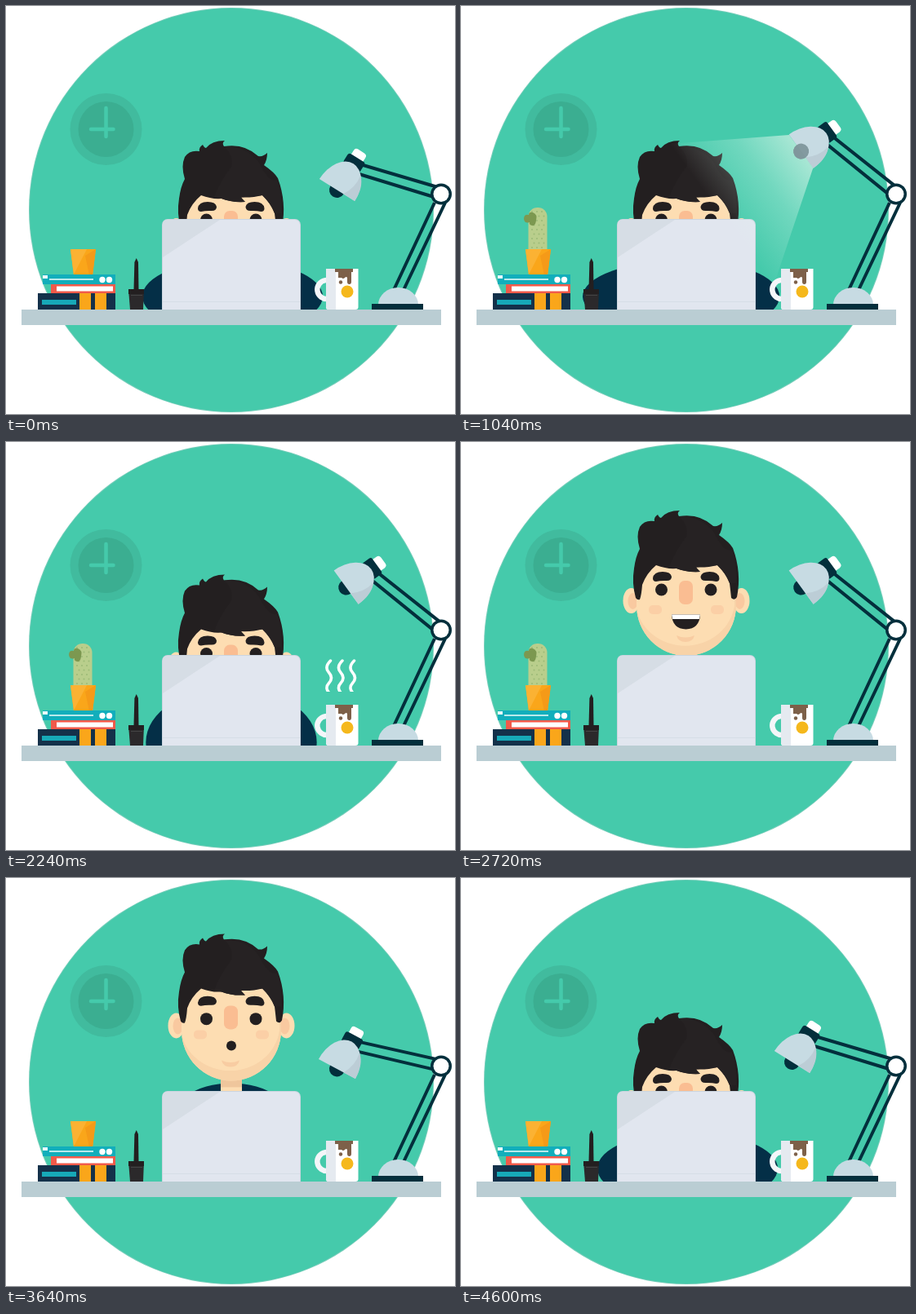
Write an HTML page with a canvas that moves like this. It is 550 px wide and 500 px high and loops after 4.64 s.

```html
<!DOCTYPE html>
<html lang="en">
<head>
<meta charset="utf-8">
<title>At the desk</title>
<style>
  html, body { margin: 0; width: 100%; height: 100%; overflow: hidden; background: #fff; }
  canvas { display: block; }
</style>
</head>
<body>
<canvas id="stage" width="550" height="500"></canvas>
<script>
const ctx = document.getElementById('stage').getContext('2d');
const LOOP = 4640;
const GREEN = '#45caab', NAVY = '#042f47', INK = '#032f3c', HAIR = '#231f20';
const SKIN = '#fdddb2', BLUSH = '#f9c9a0', STEEL = '#c7dbe3', ORANGE = '#faa61a';

// Eased value of a [time, value] track.
function track(t, keys) {
  if (t <= keys[0][0]) return keys[0][1];
  for (let i = 1; i < keys.length; i++) {
    const [t0, a] = keys[i - 1], [t1, b] = keys[i];
    if (t < t1) {
      const p = (t - t0) / (t1 - t0);
      return a + (b - a) * p * p * (3 - 2 * p);
    }
  }
  return keys[keys.length - 1][1];
}

const TRACKS = {
  head: [[2200, 0], [2600, -81], [2760, -81], [3180, -91], [3560, -91], [3760, -101], [4200, -101], [4480, 0]],
  surprise: [[3520, 0], [3720, 1], [4280, 1], [4440, 0]],
  lamp: [[360, 0], [440, -4], [700, 26], [840, 22], [3140, 22], [3240, 27], [3660, -4], [4000, 0]],
  beam: [[860, 0], [960, 1], [1400, 1], [1520, 0]],
  cactus: [[520, 0], [760, 1.08], [880, 1], [3240, 1], [3440, 0]],
  squash: [[3120, 0], [3240, 1], [3480, 0]],
  steam: [[1400, 0], [1600, 1], [2200, 1], [2400, 2], [3800, 2], [3800.1, 0], [4040, 1], [4360, 1], [4520, 2]],
  leftArm: [[600, 109], [1000, 127], [1200, 127], [1600, 115], [2160, 115], [2400, 76], [4280, 76], [4520, 109]],
  rightArm: [[0, 112], [1600, 115], [2160, 115], [2400, 76], [4280, 76], [4520, 112]],
  slump: [[1200, 0], [1600, 1], [2160, 1], [2400, 0]]
};

function fill(color, path) {
  ctx.fillStyle = color;
  ctx.beginPath();
  path();
  ctx.fill();
}
const rect = (x, y, w, h, color) => fill(color, () => ctx.rect(x, y, w, h));
const round = (x, y, w, h, r, color) => fill(color, () => ctx.roundRect(x, y, w, h, r));
const oval = (x, y, rx, ry, color) => fill(color, () => ctx.ellipse(x, y, rx, ry, 0, 0, Math.PI * 2));
const disc = (x, y, r, color) => oval(x, y, r, r, color);
const shape = (color, d) => { ctx.fillStyle = color; ctx.fill(new Path2D(d)); };
function stroke(color, width, d, cap = 'butt') {
  ctx.strokeStyle = color;
  ctx.lineWidth = width;
  ctx.lineCap = cap;
  ctx.stroke(new Path2D(d));
}
function group(draw) {
  ctx.save();
  draw();
  ctx.restore();
}

function background() {
  rect(0, 0, 550, 500, '#fff');
  disc(276, 250, 248, '#74cdb9');
  disc(276, 250, 247, GREEN);
  disc(122.5, 151, 44, '#41bb9e');
  disc(122.5, 151, 34, '#3bae91');
  stroke(GREEN, 4.5, 'M122.5 125V160M104 151H131.5', 'round');
}

function body(s) {
  group(() => {
    ctx.beginPath();
    ctx.rect(0, 0, 550, 373);
    ctx.clip();
    const y = 356 + 16 * s.slump, height = 45 + 30 * s.slump;
    fill(NAVY, () => {
      ctx.ellipse(276, y, s.leftArm, height, 0, Math.PI / 2, Math.PI * 1.5);
      ctx.ellipse(276, y, s.rightArm, height, 0, -Math.PI / 2, Math.PI / 2);
    });
    oval(276, 401 + s.head, 80, 55, NAVY);
  });
  rect(263, 330 + s.head, 26, 32, SKIN);
  rect(263, 330 + s.head, 26, 21, '#efc69c');
}

const HAIR_PATH = 'M214 181Q209 163 212 145Q214 130 219 121Q214 105 219 94Q225 85 237 87Q236 82 241 79' +
  'Q243 83 245 83Q252 74 268 74Q264 77 267 81Q292 77 309 93Q315 94 320 89Q320 98 316 104Q329 113 333 120' +
  'Q344 150 338 180Q335 185 331 181Q330 171 329 163Q323 149 314 141Q303 144 288 143.5Q289 147 293 149' +
  'Q276 150 264 145Q252 146 239 141Q227 151 222 165Q221 178 219 183Q216 184 214 181Z';

function head(s) {
  const lift = s.surprise;
  group(() => {
    ctx.translate(0, s.head + 91);
    for (const x of [208.5, 343.5]) {
      oval(x, 184.5, 10, 15.5, SKIN);
      oval(x + (x < 276 ? 2 : -2), 185, 6, 10, BLUSH);
    }
    const face = new Path2D('M221 130H330V165L337 175V190A61 62 0 0 1 215 190V175L221 165Z');
    ctx.fillStyle = SKIN;
    ctx.fill(face);
    group(() => {
      ctx.clip(face);
      shape('#f8d3a8', 'M338 175V252H214V190A61 57 0 0 0 335 190V175Z');
    });
    round(230, 190, 16, 11, 5, '#fbcfa6');
    round(306, 190, 16, 11, 5, '#fbcfa6');
    shape('#f8cca2', 'M264 227Q275 232 286 227Q284 235 275 235Q266 235 264 227Z');
    round(267, 160, 17, 29, 7, '#fabd92');
    for (const x of [245.5, 306]) disc(x, 171 + 8 * lift, 7.5, HAIR);
    group(() => {
      ctx.translate(0, -lift);
      shape(HAIR, 'M235 157Q236 149 247 149Q257 149 258 155Q258 160 252 160Q245 159.5 239 161Q235 161 235 157Z' +
        'M316.5 157Q315.5 149 304.5 149Q294.5 149 293.5 155Q293.5 160 299.5 160Q306.5 159.5 312.5 161Q316.5 161 316.5 157Z');
    });
    if (lift > 0.5) {
      disc(276, 209, 6, HAIR);
    } else {
      shape(HAIR, 'M258 201.5H293Q292 219 275.5 219.5Q259 219 258 201.5Z');
      shape('#fff', 'M258 201.5H293L291.8 207H259.2Z');
    }
    ctx.translate(0, -3 * lift);
    shape(HAIR, HAIR_PATH);
    shape('#262223', 'M267 81Q279 92 276 106Q262 124 255 143L264 145Q276 150 293 149L288 143.5L314 141Q326 153 329 163L337 163Q338 137 332 122Q322 126 310 101Q295 81 267 81Z');
  });
}

function laptop() {
  round(191, 261, 170, 112, [7, 7, 0, 0], '#cbd5df');
  round(192, 262, 168, 111, [6, 6, 0, 0], '#e1e6ef');
  shape('#d6dde5', 'M192 308V268Q192 262 198 262H262Z');
  rect(192, 362, 168, 1, '#d5dde6');
}

function books() {
  rect(39, 352, 95, 20, '#14314a');
  rect(44, 360, 42, 6, '#17a9b8');
  rect(90, 352, 14, 20, ORANGE);
  rect(109, 352, 14, 20, ORANGE);
  rect(55, 341, 79, 11, '#f15a4a');
  rect(62, 343.5, 69, 6, '#fff');
  rect(45, 329, 89, 12, '#12aebb');
  rect(45, 330, 6, 4, '#eafafa');
  rect(53, 334, 54, 2, '#b8eaec');
  disc(118, 335.5, 3.7, '#fff');
  disc(126.5, 335.5, 3.7, '#fff');
}

function plant(s) {
  group(() => {
    ctx.translate(94.5, 330);
    ctx.scale(1 - 0.2 * s.squash, 1 - 0.07 * s.squash);
    ctx.translate(-94.5, -330);
    if (s.cactus > 0.01) {
      group(() => {
        ctx.beginPath();
        ctx.rect(60, 220, 70, 79);
        ctx.clip();
        ctx.translate(0, 54 * (1 - s.cactus));
        round(82.5, 247, 23, 70, [11, 11, 0, 0], '#b9ce8c');
        for (let row = 0; row < 9; row++)
          for (let col = 0; col < 3; col++)
            disc(87 + col * 6 + (row % 2) * 2.5, 252 + row * 5.5, 1, '#9dba77');
        shape('#7c9850', 'M77 261Q77 255 83 256Q83 252 88 253Q94 255 92 263Q91 270 87 269Q83 268 84 265Q78 267 77 261Z');
      });
    }
    shape(ORANGE, 'M79 298H110L106 330H83Z');
    shape('#fbb233', 'M79 298H99L83 329Z');
    shape('#f59a18', 'M97 306L110 298L106 330H102Z');
  });
}

function penPot() {
  shape(HAIR, 'M159.7 309L162 314L162.5 348H156.5L157.4 314Z');
  shape('#2b292b', 'M150 347H169L168 372H152Z');
  rect(150, 347, 19, 6, HAIR);
  rect(153, 354, 14, 1, '#444');
}

function mug() {
  ctx.strokeStyle = '#f4f6f9';
  ctx.lineWidth = 6.5;
  ctx.beginPath();
  ctx.ellipse(393, 347.5, 11.7, 11.5, 0, Math.PI * 0.45, Math.PI * 1.55);
  ctx.stroke();
  shape('#fff', 'M392 322H431.5V369Q431.5 372 428 372H395Q392 372 392 369Z');
  shape('#e5eaf0', 'M392 322H404V372H395Q392 372 392 369Z');
  shape('#7d6049', 'M403 322H425V326H423V338Q423 341 420.5 341Q418 341 418 338V333Q417 331 415 333Q413 335 411 333H407V326H403Z');
  disc(410, 338.5, 2.2, '#7d6049');
  disc(418, 350, 7.5, '#f5b81c');
}

function steam(amount) {
  if (amount <= 0 || amount >= 2) return;
  const top = 311 - 46 * Math.min(1, amount);
  const bottom = 311 - 46 * Math.max(0, amount - 1);
  group(() => {
    ctx.beginPath();
    ctx.rect(385, top, 50, bottom - top);
    ctx.clip();
    for (const x of [395.5, 410, 424.5])
      stroke('#fff', 3.5, `M${x + 2} 268Q${x - 6} 276 ${x} 282.5Q${x + 6} 289 ${x} 295.5Q${x - 6} 302 ${x + 2} 309`, 'round');
  });
}

function lampHead(s) {
  group(() => {
    ctx.translate(405.5, 225.5);
    ctx.rotate(32 * Math.PI / 180);
    disc(0, 0, 9.5, INK);
    if (s.beam > 0) {
      const light = ctx.createLinearGradient(0, 0, 0, 125);
      light.addColorStop(0, 'rgba(235,250,240,.6)');
      light.addColorStop(0.45, 'rgba(225,250,240,.28)');
      light.addColorStop(1, 'rgba(225,250,240,0)');
      ctx.globalAlpha = s.beam;
      shape(light, 'M-25 0H25L114 125H-102Z');
      ctx.globalAlpha = 1;
    }
    round(-8.5, -56, 17, 16, 4, '#fff');
    round(-12, -46.5, 24, 14, 3, INK);
    fill(STEEL, () => ctx.ellipse(0, 0, 25.5, 38, 0, Math.PI, Math.PI * 2));
    shape('#bccdd6', 'M9 0Q18 -14 15 -30.5Q26 -20 25.5 0Z');
    ctx.globalAlpha = s.beam * 0.95;
    disc(0, 0, 9.5, '#7f979c');
  });
}

function lamp(s) {
  stroke(INK, 4, 'M525 241L474.5 349M538 241L486.5 349');
  oval(480.5, 366, 24.5, 21, STEEL);
  rect(448, 365, 63, 7, INK);
  group(() => {
    ctx.translate(533, 230.5);
    ctx.rotate(s.lamp * Math.PI / 180);
    ctx.translate(-533, -230.5);
    stroke(INK, 4, 'M434 194L527 221.5M431 205.5L524 234');
    lampHead(s);
  });
  disc(533, 230.5, 13, INK);
  disc(533, 230.5, 9.5, '#fff');
}

function render(t) {
  const s = {};
  for (const name in TRACKS) s[name] = track(t, TRACKS[name]);
  background();
  body(s);
  head(s);
  laptop();
  plant(s);
  books();
  penPot();
  steam(s.steam);
  mug();
  lamp(s);
  rect(19, 372, 514, 19, '#bacdd3');
}

const start = performance.now();
function tick() {
  render((performance.now() - start) % LOOP);
  requestAnimationFrame(tick);
}
tick();
</script>
</body>
</html>
```
